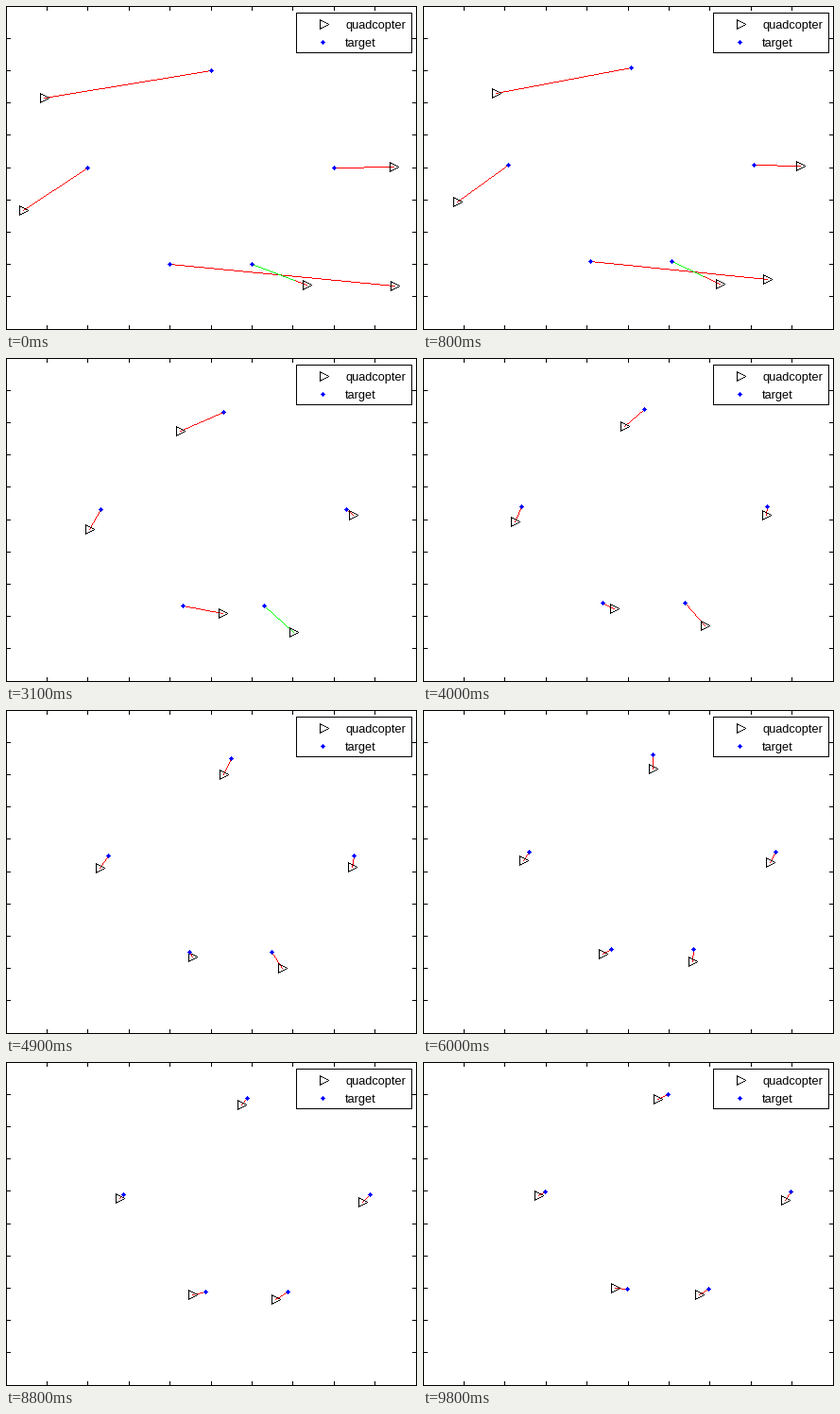
These frames come from a looping animation (435 px wide and 343 px high, 9.9 s). A matplotlib script:

```python
import numpy as np
import matplotlib.pyplot as plt
from matplotlib.animation import FuncAnimation
from matplotlib.collections import PolyCollection

W, H, DPI = 435, 343, 64
FRAMES, INTERVAL = 99, 100
CELL = np.array([43.4, 34.2])  # tick spacing
SQUARE = np.array([(0, 0), (1, 0), (1, 1), (0, 1)])
RED, GREEN, BLUE = "#ff0000", "#00ff00", "#0000ff"

# Target starts in tick units from the top left; all drift one cell per 100 steps.
STARTS = np.array([(5, 2), (2, 5), (8, 5), (4, 8), (6, 8)])

# Each quadcopter cruises straight to its second point, then settles.
TIMES = np.array([0, 31, 49, 78, 98])
ROUTES = [
    [(40, 97), (184, 77), (230, 68), (248, 51), (248, 39)],
    [(18, 216), (88, 181), (99, 167), (117, 147), (122, 141)],
    [(410, 170), (367, 166), (366, 166), (371, 151), (383, 146)],
    [(411, 296), (229, 270), (197, 261), (193, 252), (203, 239)],
    [(318, 295), (304, 290), (292, 273), (280, 257), (292, 246)],
]


def follow(route):
    """Position at every step: cubic Hermite with a constant-speed first leg."""
    p = np.array(route, float)
    m = np.gradient(p, TIMES, axis=0)
    m[1] = m[0]
    n = np.arange(FRAMES)
    i = np.clip(np.searchsorted(TIMES, n, side="right") - 1, 0, len(p) - 2)
    h = (TIMES[i + 1] - TIMES[i])[:, None]
    u = (n - TIMES[i])[:, None] / h
    ease = u * u * (3 - 2 * u)
    bend = h * u * (1 - u) * ((1 - u) * m[i] - u * m[i + 1])
    return np.round(p[i] + ease * (p[i + 1] - p[i]) + bend)


def segment(a, b):
    """Pixels of a one-pixel line from a to b."""
    a, b = np.array(a), np.array(b)
    steps = int(np.abs(b - a).max())
    return np.floor(np.linspace(a, b, steps + 1) + 0.5)


def outline(*corners):
    return np.vstack([segment(a, b) for a, b in zip(corners, corners[1:] + corners[:1])])


def frame_box(x0, y0, x1, y1):
    return outline((x0, y0), (x1, y0), (x1, y1), (x0, y1))


def squares(pixels):
    return pixels[:, None, :] + SQUARE


TRIANGLE = outline((-4, -5), (5, 0), (-4, 5))
DOT = np.array([(x, y) for x in range(-2, 3) for y in range(-2, 3)
                if abs(x) + abs(y) <= 2])

fig = plt.figure(figsize=(W / DPI, H / DPI), dpi=DPI, facecolor="white")
ax = fig.add_axes([0, 0, 1, 1])
ax.set_xlim(0, W)
ax.set_ylim(H, 0)
ax.axis("off")


def paint(pixels, color="black", z=1):
    art = PolyCollection(squares(pixels), facecolors=color, edgecolors="none",
                         linewidths=0, zorder=z)
    return ax.add_collection(art, autolim=False)


paint(frame_box(0, 0, W - 1, H - 1))
for k in range(1, 10):
    x, y = np.floor(k * CELL + 1e-6)
    paint(segment((x, 0), (x, 4)))
    paint(segment((x, H - 5), (x, H - 1)))
    paint(segment((0, y), (4, y)))
    paint(segment((W - 5, y), (W - 1, y)))

paint(frame_box(307, 7, 429, 49))
paint(TRIANGLE + (336, 19))
paint(DOT + (335, 38), BLUE)
for label, base in (("quadcopter", 24), ("target", 43)):
    ax.text(359, base, label, family="Liberation Sans", size=12.8 * 72 / DPI,
            va="baseline")

tracks = [follow(r) for r in ROUTES]
links = [paint(DOT, RED, 2) for _ in ROUTES]
copters = [paint(TRIANGLE, z=3) for _ in ROUTES]
dots = [paint(DOT, BLUE, 4) for _ in ROUTES]
green_link = paint(DOT, GREEN, 2.5)


def green_share(n):
    """Share of the last link, from its target, that is green."""
    if n < 22:
        return 0.78 - 0.014 * n
    return 1.0 if n < 40 else 0.0


def update(n):
    targets = np.floor((STARTS + (n / 100, -n / 100)) * CELL + 1e-6)
    for target, track, link, copter, dot in zip(targets, tracks, links, copters, dots):
        pixels = segment(target, track[n])
        link.set_verts(squares(pixels))
        copter.set_verts(squares(TRIANGLE + track[n]))
        dot.set_verts(squares(DOT + target))
    green_link.set_verts(squares(pixels[:int(len(pixels) * green_share(n))]))
    return [*links, green_link, *copters, *dots]


anim = FuncAnimation(fig, update, frames=FRAMES, interval=INTERVAL,
                     repeat=True, repeat_delay=0, blit=False)
plt.show()
```
